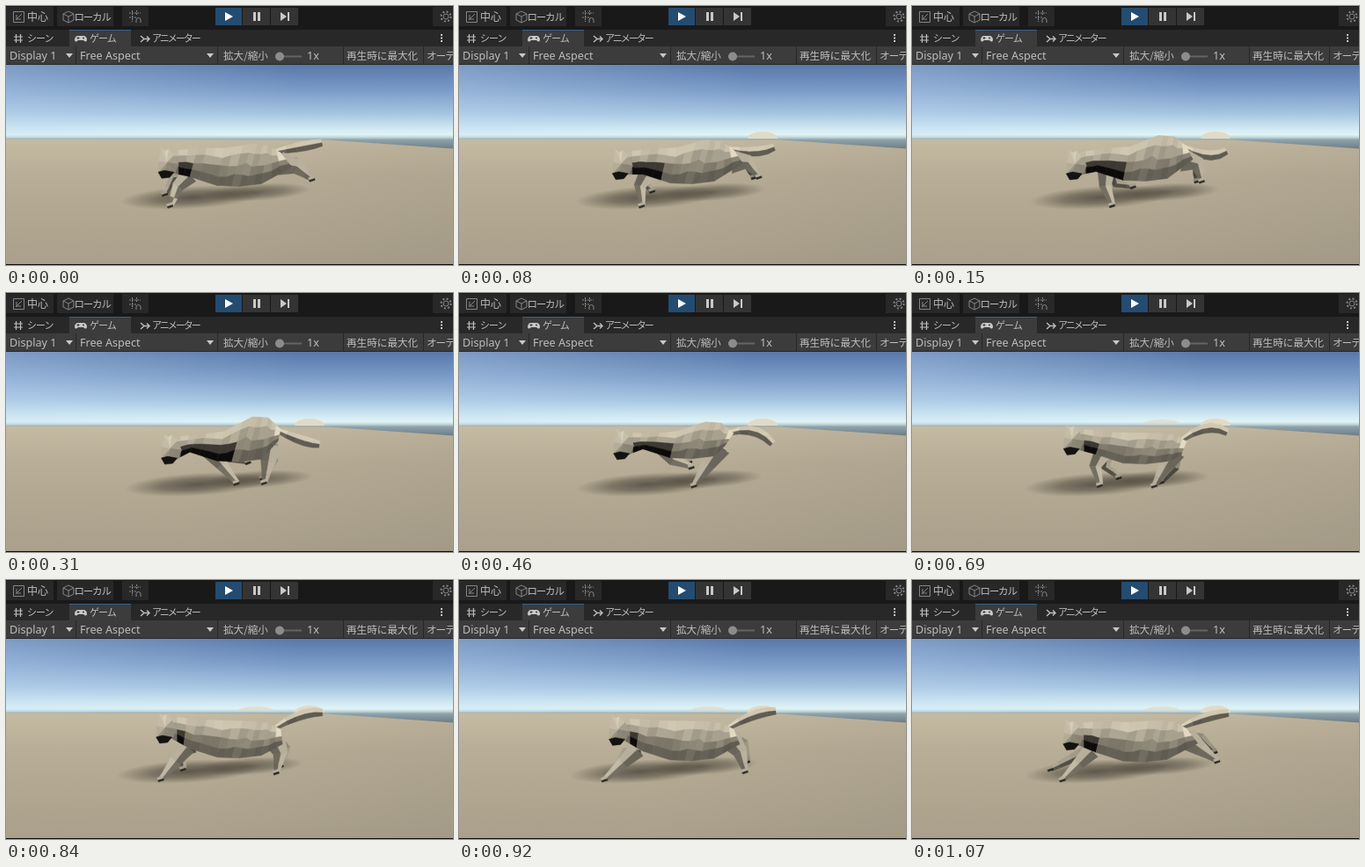
Animation of 508x295 px, one loop 1.15 s. Source, as an HTML page with a canvas:

```html
<!DOCTYPE html>
<html lang="ja">
<head>
<meta charset="utf-8">
<title>Running cat preview</title>
<style>
  html, body { margin: 0; width: 508px; height: 295px; overflow: hidden; background: #191919; }
  canvas, svg { position: absolute; left: 0; top: 0; display: block; }
  text { font: 12px "Noto Sans CJK JP", "Noto Sans CJK", "Noto Sans", sans-serif; fill: #bdbdbd; }
  .latin { font: 12.6px "Noto Sans", sans-serif; }
  .tab { font-size: 11px; letter-spacing: -1px; }
  .small { font-size: 11.6px; }
  .icon { fill: none; stroke: #bdbdbd; stroke-width: 1.2; }
  .dim { stroke: #858585; stroke-width: 1; }
</style>
</head>
<body>
<canvas id="scene" width="508" height="295"></canvas>
<svg width="508" height="295" viewBox="0 0 508 295">
  <rect width="508" height="67" fill="#191919"/>
  <g fill="#343434">
    <path d="M269 2H300V22H269ZM301 2H332V22H301Z"/>
    <path d="M0 1H54V23H0ZM58 1H122V23H58ZM132 1H162V23H132ZM485 1H508V23H485Z" fill="#282828"/>
    <rect x="238" y="2" width="30" height="20" fill="#244c70"/>
  </g>
  <rect y="27" width="508" height="19" fill="#282828"/>
  <rect x="72" y="27" width="70" height="19" fill="#3c3c3c"/>
  <rect x="72" y="27" width="70" height="1" fill="#34618d"/>
  <rect y="46" width="508" height="21" fill="#3c3c3c"/>
  <path d="M79.500 46V67M240.500 46V67M383.500 46V67M474.500 46V67M0 66.500H508" stroke="#272727"/>

  <g class="icon">
    <g class="dim">
      <path d="M8.500 6.500H20.500V18.500H8.500ZM11 16L18 9M12 10V15H17"/>
      <path d="M65 9L71 6L77 9V16L71 19L65 16ZM65 9L71 12L77 9M71 12V19"/>
      <path d="M140 8H153M140 13H148M143.500 5V18M148.500 5V11" stroke-dasharray="2 1"/>
      <path d="M148 19V16a2.500 2.500 0 0 1 5 0V19"/>
      <circle cx="500" cy="12" r="3"/>
      <circle cx="500" cy="12" r="5.500" stroke-width="2" stroke-dasharray="2 2.300"/>
    </g>
    <path d="M9 35H19M9 39H19M11.500 32V42M16.500 32V42"/>
    <path d="M153 34L157 37.500H163M153 41L157 37.500M160 34.500L163 37.500L160 40.500" stroke-width="1.400"/>
    <path d="M311 57.500H336" stroke="#656565" stroke-width="2"/>
  </g>
  <g fill="#c8c8c8">
    <path d="M249 7L258 12L249 17Z" fill="#fff"/>
    <path d="M281 7H284V17H281ZM286 7H289V17H286ZM312 7L319 12L312 17ZM320 7H322V17H320Z"/>
    <path d="M68 54H76L72 59ZM228 54H236L232 59Z"/>
    <path d="M81 34H89Q92 35 92 39Q91 42 88 39H82Q79 42 78 39Q78 35 81 34Z"/>
    <path d="M80.500 36.500H83.500M82 35V38" stroke="#3c3c3c"/>
    <circle cx="88" cy="36.500" r="1" fill="#3c3c3c"/>
    <path d="M494 32h2v2h-2zM494 35.500h2v2h-2zM494 39h2v2h-2z"/>
    <circle cx="311" cy="57.500" r="5" fill="#8c8c8c"/>
  </g>

  <text x="24" y="16.500">中心</text>
  <text x="77.500" y="16.500" style="font-size:11.500px;letter-spacing:-1.200px">ローカル</text>
  <text class="tab" x="24" y="41">シーン</text>
  <text class="tab" x="95" y="41">ゲーム</text>
  <text class="tab" x="166" y="41" style="letter-spacing:-2px">アニメーター</text>
  <text class="latin" x="4" y="61">Display 1</text>
  <text class="latin" x="84" y="61">Free Aspect</text>
  <text class="small" x="247" y="61">拡大/縮小</text>
  <text class="latin" x="342" y="61">1x</text>
  <text class="small" x="387" y="60.500">再生時に最大化</text>
  <text class="small" x="478" y="60.500" letter-spacing="-1">オーデ</text>
</svg>
<script>
const ctx = document.getElementById('scene').getContext('2d');
const LOOP = 1150, COUNT = 15;
const STEPS = Array.from({ length: COUNT }, (_, i) => Math.round(i * LOOP / COUNT / 10) * 10);

// Gait rules: every joint follows a wave or a pulse of the stride.
const angle = (t, peak) => 2 * Math.PI * (t - peak) / LOOP;
const pulse = (t, peak, sharp) => ((1 + Math.cos(angle(t, peak))) / 2) ** sharp;
function wave(t, mean, reach, peak, skew = 0) {
  const a = angle(t, peak);
  return mean + reach * Math.cos(a - skew * (1 - Math.cos(a)));
}

const mix = (a, b, k) => a + (b - a) * k;
const mixPoint = (a, b, k) => [mix(a[0], b[0], k), mix(a[1], b[1], k)];
const noise = n => { const s = Math.sin(n * 127.1 + 31.7) * 43758.55; return s - Math.floor(s); };
const divide = (points, n) => points.flatMap((p, i) =>
  i ? Array.from({ length: n }, (_, j) => mixPoint(points[i - 1], p, (j + 1) / n)) : [p]);
const tone = v => `rgb(${v | 0},${v * .955 | 0},${v * .85 | 0})`;

function catAt(t) {
  const crouch = pulse(t, 310, 2);
  const hx = wave(t, 176.5, 3, 320), hy = wave(t, 157.2, 6.8, 135);
  const spine = 160.5 + .3 * (hy - 157);
  const sag = wave(t, 197, 10.5, 1020) + 3 * crouch;
  const shoulder = x => [mix(218, x, .3), sag - 13];
  const hip = x => [mix(303, x, .2), 181 - 8 * crouch];
  const leg = (x, y, joint, bend) => limbPath(joint(x), [x, y], bend);
  return {
    crouch,
    head: [hx, hy],
    back: [[hx + 9, hy + 3], [218, spine], [248, spine + 1 - 5 * crouch],
      [280, 161 - 20 * crouch], [298, 163 - 21 * crouch], [312, 170 - 15 * crouch]],
    belly: [[hx + 14, hy + 28], [209, sag - 11], [240, sag - 1],
      [265, sag], [290, sag - 3], [wave(t, 313, 12, 1110), 187 - 18 * crouch]],
    tail: arc([307, 168 - 12 * crouch], [335, 154 + 17 * pulse(t, 205, 3)],
      [358 + wave(t, 0, 2, 950), wave(t, 161, 12, 370)]),
    nearFore: leg(wave(t, 216, 52, 395), 227 - 30 * pulse(t, 490, 4), shoulder, -1),
    farFore: leg(wave(t, 216, 60, 290, .6), 215 - 25 * pulse(t, 390, 2), shoulder, -1),
    nearHind: leg(wave(t, 306, 43, 1120), 219 - 25 * pulse(t, 65, 4), hip, 1),
    farHind: leg(wave(t, 307, 38, 1100), 215 - 22 * pulse(t, 10, 2), hip, 1)
  };
}

// The closer the paw comes to its joint, the more the leg folds.
function limbPath(joint, paw, bend) {
  const dx = paw[0] - joint[0], dy = paw[1] - joint[1], d = Math.hypot(dx, dy);
  const fold = bend * .32 * Math.sqrt(Math.max(0, 43 ** 2 - d * d)) / d;
  const along = (k, out) => [joint[0] + dx * k + dy * fold * out, joint[1] + dy * k - dx * fold * out];
  return [joint, along(.45, 1), along(.78, .35), paw];
}

function arc(a, through, b) {
  const mid = mixPoint(a, b, .5), control = mixPoint(mid, through, 2);
  return Array.from({ length: 6 }, (_, i) =>
    mixPoint(mixPoint(a, control, i / 5), mixPoint(control, b, i / 5), i / 5));
}

function facet(points, value) {
  ctx.beginPath();
  points.forEach(p => ctx.lineTo(p[0], p[1]));
  ctx.closePath();
  ctx.fillStyle = ctx.strokeStyle = tone(value);
  ctx.lineWidth = .5;
  ctx.fill();
  ctx.stroke();
}

function gradient(x0, y0, x1, y1, stops) {
  const g = ctx.createLinearGradient(x0, y0, x1, y1);
  stops.forEach(([at, color]) => g.addColorStop(at, color));
  return g;
}

function drawWorld() {
  ctx.fillStyle = gradient(0, 67, 0, 164, [
    [0, '#5878a9'], [.3, '#7b9cc8'], [.57, '#a5c4e0'], [.74, '#cfe7f2'],
    [.82, '#e0f4f7'], [.85, '#c4d8da'], [.88, '#8ea3aa'], [1, '#68767f']]);
  ctx.fillRect(0, 67, 508, 100);
  ctx.fillStyle = gradient(0, 67, 330, 67, [[0, 'rgba(195,222,245,.34)'], [1, 'rgba(195,222,245,0)']]);
  ctx.fillRect(0, 67, 508, 83);
  ctx.beginPath();
  [[0, 151.5], [365, 152.5], [508, 162.5], [508, 295], [0, 295]].forEach(p => ctx.lineTo(...p));
  ctx.fillStyle = gradient(0, 151, 0, 294, [[0, '#c5baa2'], [.3, '#b8ad96'], [1, '#aaa08b']]);
  ctx.fill();
  ctx.fillStyle = gradient(0, 0, 508, 0, [[.4, 'rgba(110,108,100,0)'], [1, 'rgba(110,108,100,.12)']]);
  ctx.fill();
  ctx.fillStyle = '#0c0c0c';
  ctx.fillRect(0, 294, 508, 1);
}

function drawGlow(x, y, rx, ry, color) {
  ctx.fillStyle = color;
  ctx.beginPath();
  ctx.ellipse(x, y, rx, ry, 0, Math.PI, 2 * Math.PI);
  ctx.fill();
}

function drawShadow(x, y, rx, ry, alpha) {
  ctx.save();
  ctx.translate(x, y);
  ctx.rotate(-.06);
  ctx.scale(rx, ry);
  const g = ctx.createRadialGradient(0, 0, 0, 0, 0, 1);
  g.addColorStop(0, `rgba(42,37,30,${alpha})`);
  g.addColorStop(.5, `rgba(42,37,30,${alpha * .65})`);
  g.addColorStop(1, 'rgba(42,37,30,0)');
  ctx.fillStyle = g;
  ctx.fillRect(-1, -1, 2, 2);
  ctx.restore();
}

// A limb with a light upper and a dark lower side.
function drawLimb(mid, width, light, dark) {
  const last = mid.length - 1;
  const edge = side => mid.map((p, i) => {
    const a = mid[Math.max(0, i - 1)], b = mid[Math.min(last, i + 1)];
    const dx = b[0] - a[0], dy = b[1] - a[1], r = side * width(i / last) / 2 / Math.hypot(dx, dy);
    return [p[0] + dy * r, p[1] - dx * r];
  });
  const one = edge(1), two = edge(-1), height = p => p[1] - p[0] * .5;
  for (let i = 1; i <= last; i++) {
    const oneLit = height(one[i - 1]) + height(one[i]) < height(two[i - 1]) + height(two[i]);
    const vary = noise(i + light) * 20;
    facet([one[i - 1], one[i], mid[i], mid[i - 1]], (oneLit ? light : dark) + vary);
    facet([mid[i - 1], mid[i], two[i], two[i - 1]], (oneLit ? dark : light) + vary);
  }
}

function drawLeg(path, thigh, light, dark) {
  drawLimb(path, k => mix(6, thigh, (1 - k) ** 1.6), light, dark);
  const [x, y] = path[path.length - 1];
  drawLimb([[x + 2, y - 1], [x - 4, y + 1]], () => 5, light, 40);
}

function drawBody({ back, belly, crouch }) {
  const top = divide(back, 3), low = divide(belly, 3), cols = top.length - 1, rows = 4;
  const at = (c, r) => mixPoint(top[c], low[c],
    r / rows + (r % rows ? (noise(c * 5 + r) - .5) * .1 : 0));
  for (let c = 0; c < cols; c++) {
    const u = (c + .5) / cols, throat = u > .07 && u < .16 + .35 * crouch;
    for (let r = 0; r < rows; r++) {
      let value = 204 - 34 * r + (noise(c * 7 + r * 3) - .5) * 26;
      if (throat && r > 1) value = r === 3 ? 12 : 60;
      if (c === cols - 1 && r < 2) value = 228;
      facet([at(c, r), at(c + 1, r), at(c + 1, r + 1), at(c, r + 1)], value);
    }
  }
}

const SKULL = [[0, 0], [5, 3], [9, 1], [15, 8], [20, 18], [16, 28], [3, 30], [-3, 27], [-2, 14]];
const MUZZLE = [[-3, 27], [4, 25], [15, 27], [10, 33], [1, 34]];

function drawHead([x, y]) {
  const place = p => [p[0] + x, p[1] + y];
  SKULL.forEach((p, i) => {
    const next = SKULL[(i + 1) % SKULL.length];
    facet([p, next, [7, 16]].map(place), 206 - 2 * (p[1] + next[1]) / 2 - 1.2 * p[0] + noise(i) * 20);
  });
  facet(MUZZLE.map(place), 20);
}

function draw(t) {
  const cat = catAt(t);
  drawWorld();
  if (t >= 80) drawGlow(345, 151, 17, 8, '#e2dac6');
  if (t >= 540) drawGlow(284, 150, 22, 6, 'rgba(222,216,198,.6)');
  drawShadow(wave(t, 212, 5, 300), 218, 82, 13, .62);
  drawShadow(wave(t, 282, 6, 200), 212, 62, 10, .52);
  drawLeg(cat.farFore, 14, 160, 74);
  drawLeg(cat.farHind, 16, 142, 60);
  drawLimb(cat.tail, k => 5 + 6 * Math.sin(Math.PI * .85 * k), 206, 92);
  drawLeg(cat.nearFore, 20, 178, 100);
  drawLeg(cat.nearHind, 26, 176, 100);
  drawBody(cat);
  drawHead(cat.head);
}

const start = performance.now();
function tick() {
  const t = (performance.now() - start) % LOOP;
  draw(STEPS.filter(s => s <= t).pop());
  requestAnimationFrame(tick);
}
tick();
</script>
</body>
</html>
```
